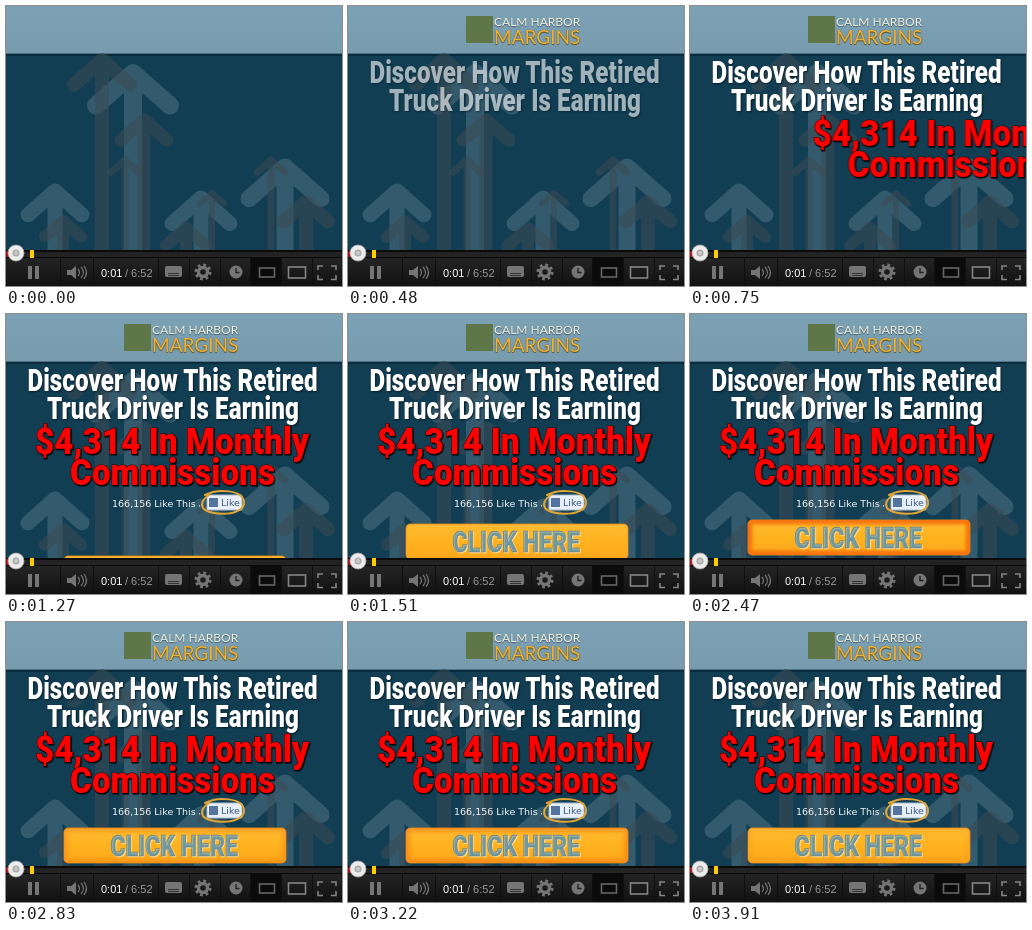
These frames come from a looping animation (336 px wide and 280 px high, 3.94 s). An HTML page:

```html
<!DOCTYPE html>
<html lang="en">
<head>
<meta charset="utf-8">
<title>Video banner</title>
<style>
  html, body { margin: 0; width: 100%; height: 100%; overflow: hidden; background: #123e53; }
  svg { display: block; width: 336px; height: 280px; }
  .display { font-family: Roboto, "Open Sans", sans-serif; font-weight: 800; text-anchor: middle; }
  .headline { font-size: 31px; fill: #fff; letter-spacing: .1px; text-shadow: 1px 1px 2px #061b27; }
  .amount { font-size: 37px; font-weight: 900; fill: #f00; stroke: #2a0a0c; stroke-width: 1px; paint-order: stroke; text-shadow: 1px 1px 1px #000; }
  .cta { font-size: 30px; fill: #6e979f; stroke: #567880; stroke-width: .5px; text-shadow: 1px 1px 1px #ffe0a0; }
  .brand { font-family: Lato, sans-serif; font-size: 12px; fill: #f1f0dc; text-shadow: 0 1px 1px #40596a; }
  .brand.big { font-size: 19px; fill: #f0b030; text-shadow: 0 0 1px #57512c, 0 1px 1px #57512c; }
  .likes { font-family: "DejaVu Sans", sans-serif; font-size: 9.5px; fill: #f4f8fa; }
  .time { font-family: "Liberation Sans", Arial, sans-serif; font-size: 11px; fill: #fff; }
</style>
</head>
<body>
<svg viewBox="0 0 336 280">
  <defs>
    <linearGradient id="sky" x2="0" y2="1"><stop stop-color="#7ca1b4"/><stop offset="1" stop-color="#789cae"/></linearGradient>
    <linearGradient id="gold" x2="0" y2="1"><stop stop-color="#ffbb33"/><stop offset=".5" stop-color="#ffb21e"/><stop offset="1" stop-color="#fba71c"/></linearGradient>
    <linearGradient id="bar" x2="0" y2="1"><stop stop-color="#242424"/><stop offset="1" stop-color="#111"/></linearGradient>
    <clipPath id="face"><rect x="58" y="206" width="222" height="35" rx="4"/></clipPath>
    <filter id="soft"><feGaussianBlur stdDeviation="1.8"/></filter>
  </defs>

  <rect width="336" height="280" fill="#123e53"/>
  <rect width="336" height="48" fill="url(#sky)"/>
  <rect y="47" width="336" height="1" fill="#4f7385"/>
  <rect y="48" width="336" height="2" fill="#0a2c3d"/>
  <g id="arrows" fill="none" stroke-linecap="round" stroke-linejoin="round"></g>

  <g id="brand">
    <rect x="118" y="10" width="27" height="27" fill="#5f7748"/>
    <text class="brand" x="146" y="20">CALM HARBOR</text>
    <text class="brand big" x="146" y="38">MARGINS</text>
  </g>

  <g id="headline" class="display headline">
    <g transform="translate(166.500 76.500) scale(.78 1)"><text>Discover How This Retired</text></g>
    <g transform="translate(167 105) scale(.78 1)"><text>Truck Driver Is Earning</text></g>
  </g>

  <g id="amount" class="display amount">
    <g transform="translate(166 139.500) scale(.9 1)"><text>$4,314 In Monthly</text></g>
    <g transform="translate(166.500 171) scale(.9 1)"><text>Commissions</text></g>
  </g>

  <g id="likes">
    <text class="likes" x="106" y="193">166,156 Like This</text>
    <rect x="193" y="191" width="1" height="1.500" fill="#c5d2d8"/>
    <rect x="201" y="181" width="35" height="15" rx="1" fill="#e9eff6" stroke="#a9bdcf"/>
    <rect x="203" y="184" width="9" height="9" fill="#54749f"/>
    <text class="likes" x="215" y="192" style="fill:#3c5c8c">Like</text>
    <path d="M199 181C212 174 237 176 238 188C239 202 205 203 197 194C194 188 198 184 203 181" fill="none" stroke="#e0a535" stroke-width="2" stroke-linecap="round"/>
  </g>

  <g id="button">
    <rect x="57.500" y="205.500" width="223" height="36" rx="5" fill="#c9801c"/>
    <rect x="58.500" y="206.500" width="221" height="34" rx="4" fill="url(#gold)" stroke="#f9a52c"/>
    <g clip-path="url(#face)">
      <rect id="glow" x="58" y="206" width="222" height="35" rx="4" fill="none" stroke="#f5700c" stroke-width="9" filter="url(#soft)"/>
    </g>
    <g class="display cta" transform="translate(168 234) scale(.77 1)"><text>CLICK HERE</text></g>
  </g>

  <g id="controls">
    <rect y="244" width="336" height="36" fill="#0b0b0b"/>
    <rect y="246" width="336" height="5" fill="#232323"/>
    <rect y="252" width="336" height="28" fill="url(#bar)"/>
    <rect x="245" y="252" width="30" height="28" fill="#0b0b0b"/>
    <path d="M54.500 252V280M87.500 252V280M152.500 252V280M183.500 252V280M214.500 252V280M244.500 252V280M275.500 252V280M306.500 252V280" stroke="#101010"/>
    <rect y="245" width="4" height="6" fill="#a11"/>
    <rect x="24" y="244" width="4" height="8" fill="#fc0"/>
    <circle cx="10" cy="247" r="8" fill="#ececec" stroke="#aaa" stroke-width=".8"/>
    <circle cx="10" cy="247" r="3.500" fill="#aaa"/>
    <circle cx="10" cy="247" r="2" fill="#ccc"/>
    <g fill="#757575">
      <path d="M22 260h4v13h-4zM29 260h4v13h-4z"/>
      <path d="M61 264h4l5-4v13l-5-4h-4z"/>
      <path d="M72 263q3 3.500 0 7M75 261q5 5.500 0 11M78 260q5 6.500 0 13" fill="none" stroke="#757575" stroke-width="1.200"/>
      <rect x="159" y="260" width="17" height="11" rx="2"/>
      <path d="M162 267.500h11M162 269.500h11" stroke="#333"/>
      <circle cx="197" cy="266" r="4.500" fill="none" stroke="#757575" stroke-width="3.400"/>
      <circle cx="197" cy="266" r="7" fill="none" stroke="#757575" stroke-width="3" stroke-dasharray="2.750"/>
      <circle cx="230" cy="266" r="6.500"/>
      <path d="M230 262v4.500h3.500" fill="none" stroke="#222" stroke-width="1.400"/>
      <g fill="none" stroke="#858585" stroke-width="1.600">
        <rect x="253.500" y="262" width="15" height="9" stroke="#666"/>
        <rect x="282.500" y="261" width="17" height="11"/>
        <path d="M312 264v-4h5M325 260h5v4M330 269v4.500h-5M317 273.500h-5v-4.500"/>
      </g>
    </g>
    <text class="time" x="95" y="271">0:01</text>
    <text class="time" x="119" y="271" style="fill:#999">/ 6:52</text>
  </g>
</svg>
<script>
const LOOP = 3940;
const STEP = 30;
const $ = id => document.getElementById(id);

// Background arrows: tip x, tip y, arm reach, stroke width, dark?
const arrows = [
  [127, 67, 37, 18, 0], [96, 54, 28, 14, 1], [138, 114, 23, 13, 1],
  [119, 154, 14, 7, 1], [49, 185, 27, 15, 0], [57, 215, 18, 12, 1],
  [195, 192, 29, 15, 0], [180, 222, 20, 12, 1], [206, 187, 12, 6, 1],
  [279, 161, 36, 17, 0], [265, 154, 14, 7, 1], [300, 196, 22, 14, 1]
];
$("arrows").innerHTML = arrows.map(([x, y, r, w, dark]) =>
  `<path d="M${x - r} ${y + r * .88}L${x} ${y}L${x + r} ${y + r * .88}M${x} ${y}V260"
    stroke="${dark ? "#3c4b55" : "#6f8c99"}" stroke-width="${w}" opacity="${dark ? .55 : .37}"/>`).join("");

// Keys are [milliseconds, styles]; values between them advance once per STEP.
function track(id, keys) {
  const all = [[0, keys[0][1]], ...keys, [LOOP, keys[keys.length - 1][1]]];
  const frames = all.map(([ms, style], i) => {
    const span = i + 1 < all.length ? all[i + 1][0] - ms : STEP;
    return { ...style, offset: ms / LOOP, easing: `steps(${Math.max(1, Math.round(span / STEP))})` };
  });
  $(id).animate(frames, { duration: LOOP, iterations: Infinity });
}
const fade = (id, from, to) => track(id, [[from, { opacity: 0 }], [to, { opacity: 1 }]]);
const slide = (id, from, to, x, y) => track(id, [
  [from, { transform: `translate(${x}px, ${y}px)` }],
  [to, { transform: "translate(0px, 0px)" }]
]);

slide("brand", 30, 330, 0, -46);
fade("headline", 300, 600);
slide("amount", 540, 840, 312, 0);
fade("likes", 880, 910);
slide("button", 1240, 1540, 0, 40);

const PULSE_START = 1540, HALF_PULSE = 300;
track("glow", Array.from({ length: 9 }, (_, i) =>
  [PULSE_START + i * HALF_PULSE, { opacity: i % 2 }]));
</script>
</body>
</html>
```
